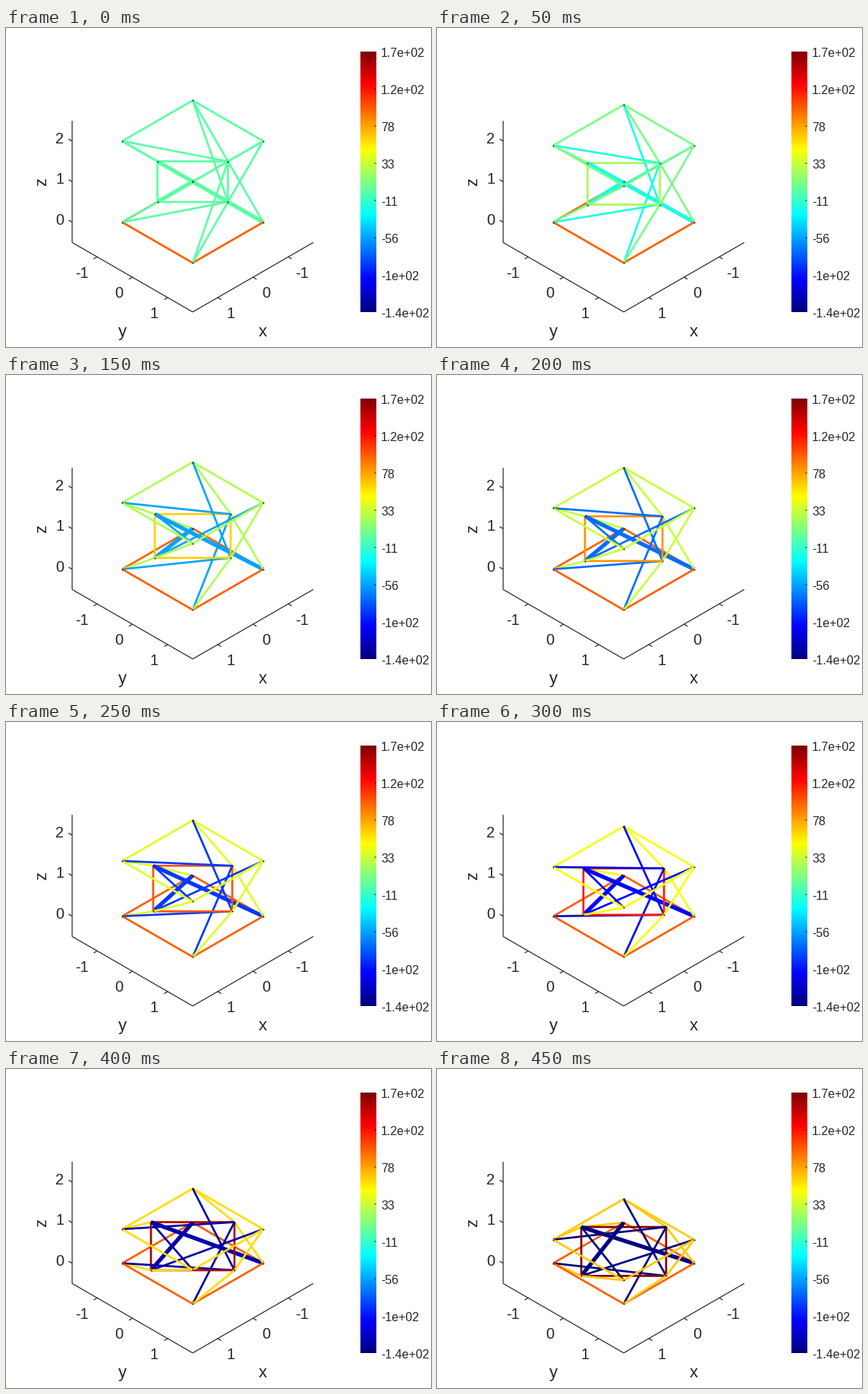
Write a matplotlib script that moves like this. It is 560 by 420 pixels and loops after 1000 ms.

```python
import numpy as np
import matplotlib.pyplot as plt
from matplotlib.animation import FuncAnimation
from matplotlib.collections import LineCollection

W, H, DPI = 560, 420, 100
PX = 72 / DPI
INK = "#262626"
FRAMES, INTERVAL, LAST_STEP = 20, 50, 9
LOW, HIGH = -144.5, 166.5
BASE_FORCE = 99.0
UNIT = np.array([46.45, 26.75, 53.4])  # pixels per unit: across, floor depth, height
DROP = [0, 5.7, 12.3, 19.3, 26.4, 34, 42, 51.5, 62, 75.8]  # top plate, pixels
CORNERS = [(1, -1), (-1, -1), (-1, 1), (1, 1)]
MIDDLES = [(1, 0), (0, -1), (-1, 0), (0, 1)]
LIMIT = 1.71


def project(p):
    x, y, z = p
    return 246 + (y - x) * UNIT[0], 255.7 + (x + y) * UNIT[1] - z * UNIT[2]


def depth(p):
    return (p[0] + p[1]) * 0.577 + p[2] * 0.577


def jet(value):
    t = (np.asarray(value) - LOW) / (HIGH - LOW)
    return np.stack([np.clip(1.5 - abs(4 * t - k), 0, 1) for k in (3, 2, 1)], -1)


def build_members():
    """Pairs of node names with kind and line width."""
    members = []
    for i in range(4):
        j = (i + 1) % 4
        members += [
            (("bottom", i), ("bottom", j), "base", 2.67),
            (("top", i), ("top", j), "cable", 2.67),
            (("mid", i), ("mid", j), "ring", 2.67),
            (("mid", i), ("bottom", i), "cable", 2.67),
            (("mid", i), ("top", (i - 1) % 4), "cable", 2.67),
            (("mid", i), ("bottom", j), "strut", 5.3 if i < 2 else 2.67),
            (("mid", i), ("top", (i + 2) % 4), "strut", 2.67),
        ]
    return members


MEMBERS = build_members()


def nodes_at(step):
    height = 2 - DROP[step] / UNIT[2]
    # Struts keep nearly constant length, so the ring widens as the top sinks.
    length_sq = 6 - 0.06 * step / LAST_STEP
    radius = np.sqrt(length_sq - 1 - height ** 2 / 4) - 1
    nodes = {}
    for i in range(4):
        nodes["bottom", i] = (*CORNERS[i], 0)
        nodes["top", i] = (*CORNERS[i], height)
        nodes["mid", i] = (MIDDLES[i][0] * radius, MIDDLES[i][1] * radius, height / 2)
    return nodes


def forces_at(step):
    s = step / LAST_STEP
    load = s + 0.23 * s * (1 - s)
    return {"base": BASE_FORCE, "cable": 66 * load,
            "ring": HIGH * load, "strut": LOW * load}


fig = plt.figure(figsize=(W / DPI, H / DPI), dpi=DPI, facecolor="white")
ax = fig.add_axes([0, 0, 1, 1])
ax.set(xlim=(0, W), ylim=(H, 0))
ax.axis("off")


def line(a, b, width=1.2):
    ax.plot([a[0], b[0]], [a[1], b[1]], color=INK, lw=width * PX,
            solid_capstyle="butt", snap=False)


def label(x, y, text, size, ha="center", rotation=0):
    options = dict(fontsize=size * PX, color=INK, ha=ha,
                   family="Liberation Sans", rotation=rotation)
    if rotation:
        ax.text(x, y, text, va="center", **options)
    else:
        ax.text(x, y + 0.36 * size, text, va="baseline", **options)


def draw_axes():
    left, front, right = [project((x, y, -0.5)) for x, y in
                          ((LIMIT, -LIMIT), (LIMIT, LIMIT), (-LIMIT, LIMIT))]
    line(project((LIMIT, -LIMIT, 2.5)), left)
    line(left, front)
    line(front, right)
    tick = 0.1
    for v in (-1, 0, 1):
        line(project((LIMIT, v, -0.5)), project((LIMIT + tick, v, -0.5)))
        line(project((v, LIMIT, -0.5)), project((v, LIMIT + tick, -0.5)))
        z = v + 1
        line(project((LIMIT, -LIMIT, z)), project((LIMIT, -LIMIT - tick, z)))
        label(71, 251.5 - 53.4 * z, str(z), 20)
    for v, x, y in ((-1, 100, 322), (0, 149, 348), (1, 195, 375)):
        label(x, y, str(v), 20)
    for v, x, y in ((1, 296.5, 375), (0, 343, 348), (-1, 390, 322)):
        label(x, y, str(v), 20)
    label(153, 398, "y", 22)
    label(338, 398, "x", 22)
    label(48, 202, "z", 22, rotation=90)


def draw_colorbar():
    x0, x1, y0, y1 = 467, 488, 31, 374
    ramp = jet(np.linspace(HIGH, LOW, 256))[:, None, :]
    ax.imshow(ramp, extent=(x0, x1, y1, y0), aspect="auto",
              interpolation="nearest")
    ax.set(xlim=(0, W), ylim=(H, 0))
    for y, value in zip(np.linspace(y0, y1, 8), np.linspace(HIGH, LOW, 8)):
        if y0 < y < y1:
            line((x1 - 3, y), (x1, y), 0.8)
        label(494, y + 1.3, f"{value:.2g}", 16, ha="left")


draw_axes()
draw_colorbar()
truss = LineCollection([], capstyle="butt", zorder=3, snap=False)
ax.add_collection(truss, autolim=False)
joints, = ax.plot([], [], "o", ms=1.9 * PX, mfc="black", mec="none", zorder=4)


def update(frame):
    step = min(frame, LAST_STEP)
    nodes, forces = nodes_at(step), forces_at(step)
    ordered = sorted(MEMBERS, key=lambda m: depth(nodes[m[0]]) + depth(nodes[m[1]]))
    truss.set_segments([[project(nodes[a]), project(nodes[b])]
                        for a, b, _, _ in ordered])
    truss.set_color([tuple(jet(forces[kind])) for _, _, kind, _ in ordered])
    truss.set_linewidth([width * PX for *_, width in ordered])
    joints.set_data(*zip(*(project(p) for p in nodes.values())))
    return truss, joints


anim = FuncAnimation(fig, update, frames=FRAMES, interval=INTERVAL,
                     repeat=True, repeat_delay=0, blit=False)
plt.show()
```
